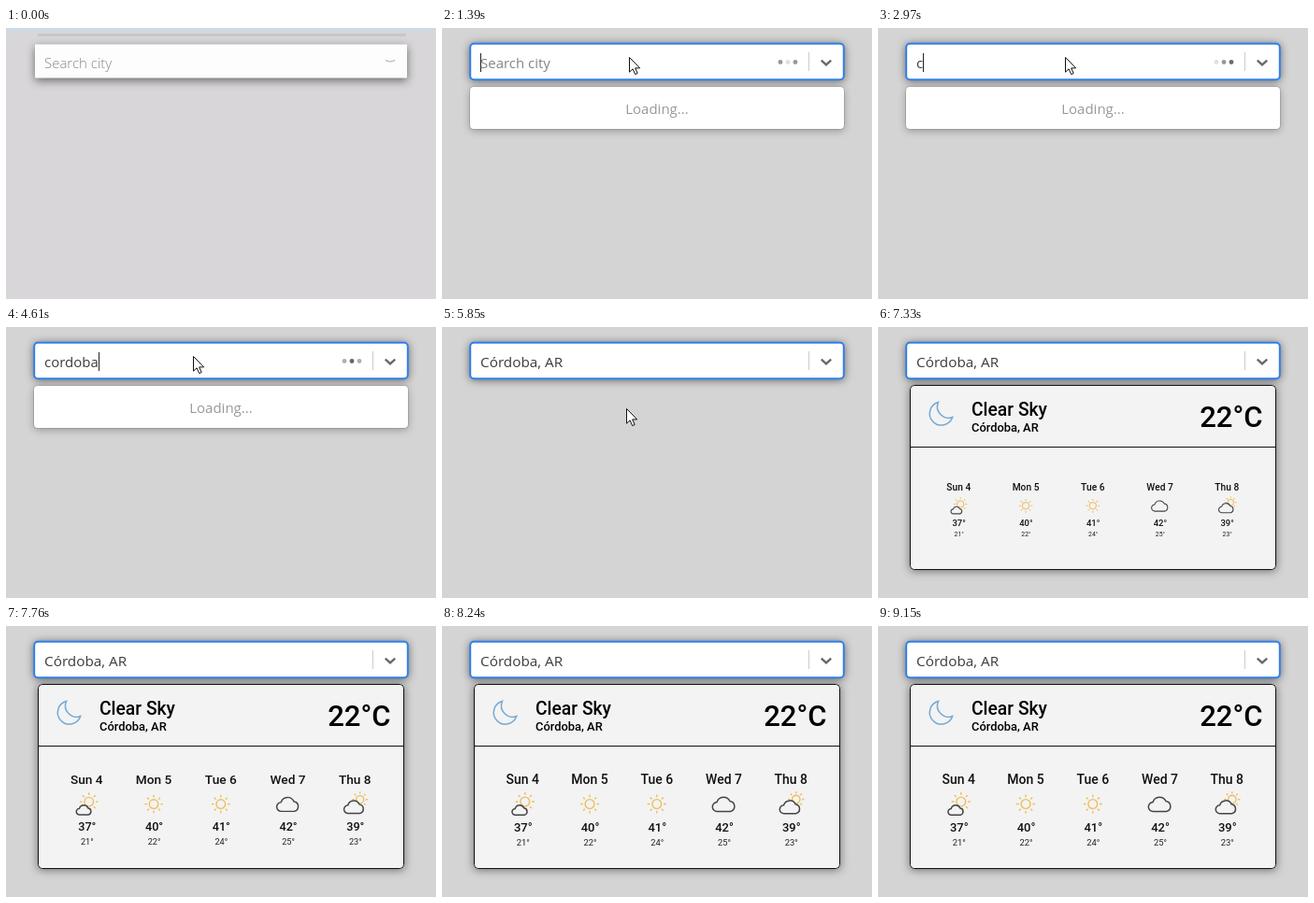
Write an HTML page with a canvas that moves like this. It is 460x290 px and loops after 9210 ms.

```html
<!DOCTYPE html>
<html lang="en">
<head>
<meta charset="utf-8">
<title>City weather search</title>
<style>
  html, body { margin: 0; width: 100%; height: 100%; overflow: hidden; background: #d4d4d4; }
  canvas { display: block; width: 460px; height: 290px; }
</style>
</head>
<body>
<canvas id="stage" width="460" height="290"></canvas>
<script>
const ctx = document.getElementById('stage').getContext('2d');
const LOOP = 9210;
const UI = '"Open Sans", "Noto Sans", sans-serif';
const CARD = 'Roboto, Arial, sans-serif';
const CITY = 'Córdoba, AR';
const QUERY = 'cordoba';

// Moments of the interaction, in ms
const SHARP = 880, ENTER = 1000, FOCUS = 1180, TYPE = 2950, KEY = 200;
const FOUND = 4910, PICK = 5620, SHOW = 6760;

const DAYS = [
  ['Sun 4', 'partly', 37, 21],
  ['Mon 5', 'sun', 40, 22],
  ['Tue 6', 'sun', 41, 24],
  ['Wed 7', 'cloud', 42, 25],
  ['Thu 8', 'cloudy', 39, 23]
];

const moon = new Path2D('M64.5 80.5A12.5 12.5 0 1 0 79.7 96.5A12 12 0 0 1 64.5 80.5Z');
const cloudShape = new Path2D('M-7 8A5 5 0 0 1-7.5-2A7.5 7.5 0 0 1 6.5-3A5.6 5.6 0 0 1 7 8Z');
const arrow = new Path2D('M.5 .5V16.2L4.1 12.8L6.7 18.6L9.2 17.5L6.7 11.9H11.7Z');

const clamp = x => Math.max(0, Math.min(1, x));
const progress = (t, from, length) => clamp((t - from) / length);
const mix = (a, b, k) => a + (b - a) * k;
const smooth = k => k * k * (3 - 2 * k);
const easeOut = k => 1 - (1 - k) * (1 - k);
const grey = v => `rgb(${v},${v},${v})`;

function text(s, x, y, font, color, align = 'left') {
  ctx.font = font;
  ctx.fillStyle = color;
  ctx.textAlign = align;
  ctx.fillText(s, x, y);
}

function box(x, y, w, h, r, fill, stroke, width = 1) {
  ctx.beginPath();
  ctx.roundRect(x, y, w, h, r);
  if (fill) { ctx.fillStyle = fill; ctx.fill(); }
  if (stroke) { ctx.strokeStyle = stroke; ctx.lineWidth = width; ctx.stroke(); }
}

function shadowBox(x, y, w, h, r, fill, alpha, blur, dy) {
  ctx.save();
  ctx.shadowColor = `rgba(0,0,0,${alpha})`;
  ctx.shadowBlur = blur;
  ctx.shadowOffsetY = dy;
  box(x, y, w, h, r, fill);
  ctx.restore();
}

function line(points, color, width) {
  ctx.beginPath();
  points.forEach(([x, y]) => ctx.lineTo(x, y));
  ctx.strokeStyle = color;
  ctx.lineWidth = width;
  ctx.stroke();
}

function drawBackground(blur) {
  ctx.fillStyle = `rgb(${mix(212, 216, blur)},${mix(212, 214, blur)},${mix(212, 216, blur)})`;
  ctx.fillRect(0, 0, 460, 290);
  if (!blur) return;
  ctx.save();
  ctx.globalAlpha = blur;
  const sky = ctx.createLinearGradient(0, 0, 0, 8);
  sky.addColorStop(0, '#c8dbe8');
  sky.addColorStop(1, 'rgba(214,214,216,0)');
  ctx.fillStyle = sky;
  ctx.fillRect(0, 0, 460, 8);
  ctx.fillStyle = 'rgba(120,120,120,.16)';
  ctx.fillRect(34, 6, 394, 3);
  ctx.restore();
}

function drawDots(t) {
  for (let i = 0; i < 3; i++) {
    const wave = Math.cos(2 * Math.PI * ((t - 4610) / 920 - (i - 1) * 0.28));
    ctx.globalAlpha = 0.6 + 0.4 * wave;
    ctx.fillStyle = '#666';
    ctx.beginPath();
    ctx.arc(362 + i * 8, 36.5, 2.4, 0, 7);
    ctx.fill();
  }
  ctx.globalAlpha = 1;
}

function drawField(t, blur) {
  const focused = t >= FOCUS;
  shadowBox(30 + blur, 16.5 + blur, 400 - 2 * blur, 39 - 3 * blur, 4 - 3 * blur, '#fff',
    mix(0.6, 0.5, blur), 10, mix(1, 3, blur));
  if (focused) box(30.2, 16.7, 399.6, 38.6, 4, '#fff', '#2f80ed', 2);
  else box(30.5 + blur, 17 + blur, 399 - 2 * blur, 38 - 3 * blur, 3, '#fefdfe', `rgba(190,190,190,${1 - blur})`);

  const count = t < FOCUS ? 0 : Math.max(0, Math.min(QUERY.length, Math.floor((t - TYPE) / KEY) + 1));
  const query = QUERY.slice(0, count);
  if (t >= PICK) text(CITY, 41, 42.5, '15.3px ' + UI, '#3c3c3c');
  else if (query) text(query, 41, 42.5, '15px ' + UI, '#3c3c3c');
  else text('Search city', 41, 42.5, (blur > 0.4 ? '300 ' : '') + '15px ' + UI, '#858585');

  if (focused && t < PICK) {
    const lastKey = count ? TYPE + (count - 1) * KEY : FOCUS;
    if ((t - lastKey) % 1060 < 530) {
      ctx.font = '15px ' + UI;
      const x = query ? 41 + ctx.measureText(query).width : 41;
      ctx.fillStyle = '#222';
      ctx.fillRect(Math.round(x), 27, 1, 20);
    }
    if (t < FOUND) drawDots(t);
  }

  ctx.globalAlpha = 1 - blur;
  ctx.fillStyle = '#ccc';
  ctx.fillRect(392, 26, 1, 20);
  ctx.globalAlpha = 1;
  const drop = mix(4.8, 1.5, blur);
  line([[405.8, 34.6], [411, 34.6 + drop], [416.2, 34.6]], focused ? '#666' : grey(mix(190, 170, blur)), mix(2.2, 1, blur));
}

function drawMenu(t) {
  shadowBox(30, 63, 400, 45, 4, '#fff', 0.3, 8, 2);
  box(29.5, 62.5, 401, 46, 4, null, 'rgba(0,0,0,.1)');
  if (t < FOUND) {
    text('Loading...', 230, 92, '15px ' + UI, '#999', 'center');
  } else {
    ctx.fillStyle = '#deebff';
    ctx.fillRect(30, 67, 400, 37);
    text(CITY, 42, 91.5, '15.3px ' + UI, '#3c3c3c');
  }
}

function drawSun(x, y, r) {
  ctx.strokeStyle = '#edbd5c';
  ctx.lineWidth = 1.4;
  ctx.beginPath();
  ctx.arc(x, y, r, 0, 7);
  for (let i = 0; i < 8; i++) {
    const c = Math.cos(i * Math.PI / 4), s = Math.sin(i * Math.PI / 4);
    ctx.moveTo(x + c * r * 1.5, y + s * r * 1.5);
    ctx.lineTo(x + c * r * 2.05, y + s * r * 2.05);
  }
  ctx.stroke();
}

function drawCloud(x, y, scale) {
  ctx.save();
  ctx.translate(x, y);
  ctx.scale(scale, scale);
  ctx.fillStyle = '#f3f3f3';
  ctx.fill(cloudShape);
  ctx.strokeStyle = '#444';
  ctx.lineWidth = 1.5 / scale;
  ctx.stroke(cloudShape);
  ctx.restore();
}

// Icons sit relative to the middle of their column
const icons = {
  sun: () => drawSun(0, -3, 4.9),
  cloud: () => drawCloud(0, -3, 1),
  partly() { drawSun(2.5, -5.5, 4.9); drawCloud(-3, 3.3, 0.68); },
  cloudy() { drawSun(5.5, -8, 4.2); drawCloud(-1, 0, 0.9); }
};

function drawCard(t) {
  ctx.save();
  ctx.globalAlpha = progress(t, SHOW - 30, 240);
  shadowBox(34, 62, 392, 198, 4, '#f3f3f3', 0.5, 10, 1);
  box(34.5, 62.5, 391, 197, 4, '#f3f3f3', '#111');
  line([[35, 128.5], [425, 128.5]], '#111', 1);

  ctx.strokeStyle = '#76a9d2';
  ctx.lineWidth = 1.5;
  ctx.stroke(moon);
  text('Clear Sky', 100, 95, '500 19.3px ' + CARD, '#000');
  text(CITY, 100, 112, '500 12.9px ' + CARD, '#000');
  text('22°C', 411.5, 106.5, '500 31px ' + CARD, '#000', 'right');

  const scale = easeOut(progress(t, SHOW, 1190));
  if (scale > 0) DAYS.forEach(([day, icon, high, low], i) => {
    ctx.save();
    ctx.translate(86.3 + i * 71.75, 193.5);
    ctx.scale(scale, scale);
    text(day, 0, -25, '500 14px ' + CARD, '#111', 'center');
    icons[icon]();
    text(high + '°', 0.5, 26.5, '500 13px ' + CARD, '#111', 'center');
    text(low + '°', 0.5, 41.5, '9.4px ' + CARD, '#222', 'center');
    ctx.restore();
  });
  ctx.restore();
}

function drawPointer(t) {
  if (t < ENTER || t >= SHOW) return;
  const enter = smooth(progress(t, ENTER, 150));
  const toOption = smooth(progress(t, 4980, 290));
  const leave = smooth(progress(t, 5980, 320));
  const x = mix(mix(212, 200, enter), 197, toOption);
  const y = mix(mix(mix(84, 31, enter), 87, toOption), 176, leave);
  ctx.save();
  ctx.translate(x, y);
  ctx.fillStyle = '#fff';
  ctx.fill(arrow);
  ctx.strokeStyle = '#111';
  ctx.lineWidth = 1;
  ctx.stroke(arrow);
  ctx.restore();
}

function draw(now) {
  const t = now % LOOP;
  const blur = 1 - easeOut(progress(t, 30, SHARP));
  drawBackground(blur);
  drawField(t, blur);
  if (t >= FOCUS && t < PICK) drawMenu(t);
  if (t >= SHOW) drawCard(t);
  drawPointer(t);
}

function tick() {
  draw(performance.now());
  requestAnimationFrame(tick);
}
tick();
</script>
</body>
</html>
```
